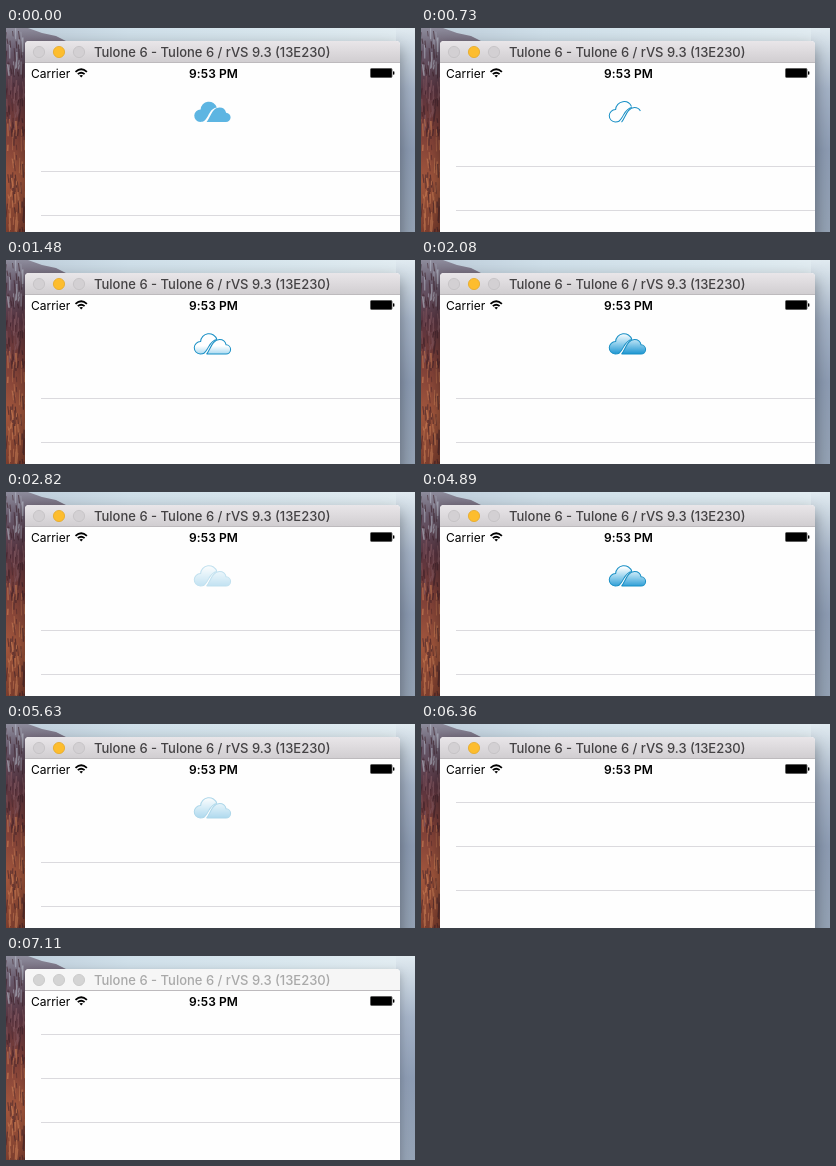
Animation of 409x204 px, one loop 7.21 s. Source, as an HTML page:

```html
<!DOCTYPE html>
<html lang="en">
<head>
<meta charset="utf-8">
<title>Cloud refresh</title>
<style>
  html, body { margin: 0; width: 100%; height: 100%; overflow: hidden; }
  svg { display: block; width: 100%; height: 100%; }
  text { font-family: Inter, Roboto, sans-serif; font-size: 12px; }
  #window { filter: drop-shadow(0 6px 8px rgba(0, 0, 0, .4)); }
  #bar { fill: url(#barFill); }
  #title { font-size: 13px; font-weight: 500; fill: #444244; }
  .button { fill: #d3d0d3; stroke: #c3c0c3; stroke-width: .8; }
  .minimize { fill: #fdbd2e; stroke: #e5a927; }
  .inactive #window { filter: drop-shadow(0 3px 5px rgba(0, 0, 0, .25)); }
  .inactive #bar { fill: #f6f6f6; }
  .inactive #title { fill: #a9a9a9; }
  .inactive .button { fill: #d4d4d4; stroke: #c6c6c6; }
  #strokes { fill: none; stroke: #188fc5; stroke-width: 1.05; }
  #solid { fill: #5db5e2; }
</style>
</head>
<body>
<svg id="stage" viewBox="0 0 409 204" preserveAspectRatio="none">
  <defs>
    <linearGradient id="sky">
      <stop stop-color="#bccbd8"/><stop offset=".3" stop-color="#cfdfe9"/>
      <stop offset=".7" stop-color="#d9e7ee"/><stop offset="1" stop-color="#e3edf2"/>
    </linearGradient>
    <linearGradient id="rock" x2="0" y2="1">
      <stop stop-color="#8d8c9c"/><stop offset=".12" stop-color="#67586a"/>
      <stop offset=".3" stop-color="#593541"/><stop offset=".5" stop-color="#7d3f38"/>
      <stop offset=".75" stop-color="#a3573d"/><stop offset="1" stop-color="#7c3e2e"/>
    </linearGradient>
    <linearGradient id="mountain" x2="0" y2="1">
      <stop stop-color="#e0eaf0"/><stop offset=".12" stop-color="#c9d5e0"/>
      <stop offset=".3" stop-color="#a5b3c7"/><stop offset=".6" stop-color="#8d9cb3"/>
      <stop offset="1" stop-color="#95a3b5"/>
    </linearGradient>
    <linearGradient id="barFill" x2="0" y2="1">
      <stop stop-color="#e9e6e9"/><stop offset="1" stop-color="#d0cdd0"/>
    </linearGradient>
    <linearGradient id="water" gradientUnits="userSpaceOnUse" x1="0" x2="0" y1="73" y2="95">
      <stop stop-color="#fff"/><stop offset=".4" stop-color="#a5d8f0"/>
      <stop offset="1" stop-color="#1793d1"/>
    </linearGradient>
    <path id="left" pathLength="1" d="M211.2 79.5C205 80.5 203.5 86 201 90S197.5 94.5 194 94.5A6.4 6.4 0 0 1 194.4 81.7A8.6 8.6 0 0 1 211.2 79.5Z"/>
    <path id="right" pathLength="1" d="M200.5 94.6C204 91.5 206 79.5 214 79.5A7 7 0 0 1 220.8 85A4.8 4.8 0 0 1 220.5 94.6Z"/>
  </defs>

  <rect width="409" height="204" fill="url(#sky)"/>
  <path d="M0 0H22L36 5L50 8L62 14V204H0Z" fill="url(#rock)"/>
  <g id="streaks" fill="none" opacity=".6"></g>
  <rect x="390" width="19" height="204" fill="url(#mountain)"/>

  <g id="window">
    <path d="M19 240V17a4 4 0 0 1 4-4H390a4 4 0 0 1 4 4V240Z" fill="#fefefe"/>
    <path id="bar" d="M19 35V17a4 4 0 0 1 4-4H390a4 4 0 0 1 4 4V35Z"/>
    <rect x="19" y="34" width="375" height="1" fill="#bdbabd"/>
  </g>
  <circle class="button" cx="33" cy="24" r="5.6"/>
  <circle class="button minimize" cx="53" cy="24" r="5.6"/>
  <circle class="button" cx="73" cy="24" r="5.6"/>
  <text id="title" x="88" y="29">Tulone 6 - Tulone 6 / rVS 9.3 (13E230)</text>

  <text x="25" y="49.5">Carrier</text>
  <g fill="none" stroke="#000" stroke-width="1.8">
    <path d="M69.5 43.8Q75.2 38.6 80.9 43.8M71.8 46.2Q75.2 43.2 78.6 46.2"/>
    <path d="M75.2 49.5L73.4 47.6Q75.2 46.2 77 47.6Z" fill="#000" stroke="none"/>
  </g>
  <text x="183" y="49.5" font-weight="600" letter-spacing=".1">9:53 PM</text>
  <rect x="364.5" y="40.5" width="21.5" height="9" rx="1" stroke="#555" stroke-width=".8"/>
  <rect x="387" y="43.3" width="1.4" height="3.4" rx=".6"/>

  <g id="list" fill="#dbdade">
    <rect x="35" width="359" height="1"/>
    <rect x="35" y="44" width="359" height="1"/>
    <rect x="35" y="88" width="359" height="1"/>
  </g>

  <g transform="translate(206.5 84) scale(.965) translate(-206.7 -84.2)">
    <g id="solid"><use href="#left"/><use href="#right"/></g>
    <g id="cloud">
      <g id="filled" fill="url(#water)"><use href="#left"/><use href="#right"/></g>
      <g id="strokes"></g>
    </g>
  </g>
</svg>
<script>
const LOOP = 7210, STEP = 148.2, LEAD = 13, BLUR_AT = 7110;
const LEFT_END = 470, RIGHT_START = 200, RIGHT_END = 800;
const FILL_END = 1800, FADE_END = 2800, CYCLE = 2900;
const REFRESH_START = 280, DISMISS_STEP = 41;
const SVG = "http://www.w3.org/2000/svg";
const get = id => document.getElementById(id);
const progress = (t, from, to) => Math.max(0, Math.min(1, (t - from) / (to - from)));

const [leftLine, rightLine] = ["left", "right"].map(id => {
  const line = get(id).cloneNode();
  line.removeAttribute("id");
  return get("strokes").appendChild(line);
});

// Vertical cracks and ledges give the cliff its texture.
function drawCliff() {
  let seed = 11;
  const random = () => (seed = seed * 16807 % 2147483647) / 2147483647;
  for (let i = 0; i < 150; i++) {
    const x = random() * 19, y = random() * 204;
    const light = y < 40 ? "#b9bfcc" : y < 90 ? "#8b6068" : "#cf8258";
    const streak = document.createElementNS(SVG, "path");
    streak.setAttribute("d", `M${x} ${y}l${random() * 3 - 1.5} ${4 + random() * 12}`);
    streak.setAttribute("stroke", random() < .5 ? "#3c2029" : light);
    streak.setAttribute("stroke-width", .6 + random());
    get("streaks").append(streak);
  }
}

function listTop(step) {
  if (step < DISMISS_STEP) return [143, 140][step] ?? 138;
  return [112, 82][step - DISMISS_STEP] ?? 78;
}

function drawCloud(phase) {
  const risen = progress(phase, RIGHT_END, FILL_END);
  leftLine.setAttribute("stroke-dasharray", `${progress(phase, 0, LEFT_END)} 2`);
  rightLine.setAttribute("stroke-dasharray", `${progress(phase, RIGHT_START, RIGHT_END)} 2`);
  get("water").setAttribute("gradientTransform", `translate(0 ${22 * (1 - risen)})`);
  get("filled").style.opacity = risen > 0 ? 1 : 0;
  get("cloud").style.opacity = 1 - progress(phase, FILL_END, FADE_END);
}

function render(now) {
  const time = now % LOOP;
  // The screen updates in coarse steps of about 148 ms.
  const step = Math.floor((time + LEAD) / STEP);
  const elapsed = step * STEP - REFRESH_START;
  const refreshing = step >= 2 && step < DISMISS_STEP;
  get("stage").classList.toggle("inactive", time >= BLUR_AT);
  get("list").setAttribute("transform", `translate(0 ${listTop(step)})`);
  get("solid").style.display = step < 2 ? "" : "none";
  get("cloud").style.display = refreshing ? "" : "none";
  if (refreshing) drawCloud(elapsed % CYCLE);
  requestAnimationFrame(() => render(performance.now() - start));
}

drawCliff();
const start = performance.now();
render(0);
</script>
</body>
</html>
```
